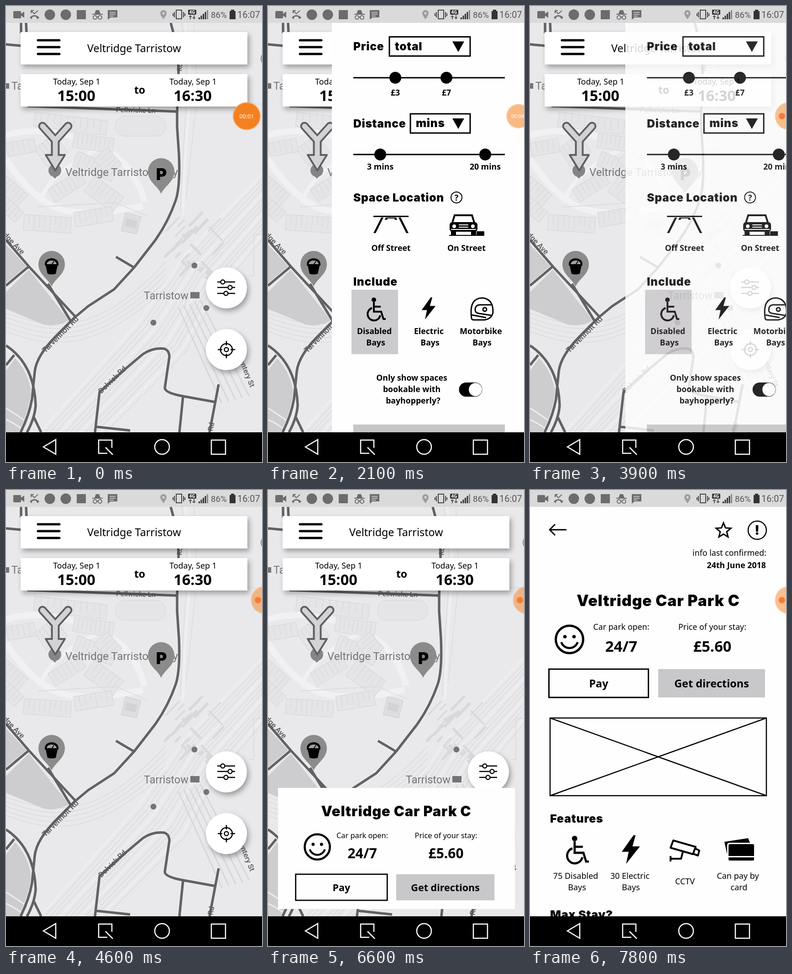
These frames come from a looping animation (561x998 px, 8 s). An HTML page:

```html
<!DOCTYPE html>
<html lang="en">
<head>
<meta charset="utf-8">
<title>Parking finder</title>
<style>
  html, body { margin: 0; width: 100%; height: 100%; overflow: hidden; background: #e9e8ea; }
  svg { display: block; width: 100%; height: 100%; }
  text { font-family: "Noto Sans", "Open Sans", sans-serif; }
  .b { font-weight: 700; }
  .h { font-family: Inter, sans-serif; font-weight: 900; letter-spacing: .03em; }
  .r { font-family: Roboto, sans-serif; fill: #747477; }
  .road { font-family: Roboto, sans-serif; font-weight: 500; fill: #59595c; }
  .m { text-anchor: middle; }
  .e { text-anchor: end; }
  .line { fill: none; stroke: #000; stroke-width: 3; }
  .shadow { filter: drop-shadow(4px 6px 6px #0005); }
</style>
</head>
<body>
<svg viewBox="0 0 561 998" preserveAspectRatio="none">
  <defs>
    <clipPath id="screen"><rect y="37" width="561" height="896"/></clipPath>
    <g id="wheelchair" fill="none" stroke="#000" stroke-width="4">
      <circle cx="-1" cy="-21" r="5" fill="#000" stroke="none"/>
      <path d="M-1-16V5H15L20 21H25M-1-6H14M-5-3A14 14 0 1 0 13 13"/>
    </g>
    <path id="bolt" d="M5-27L-17 4H-4L-9 27L17-6H3L9-27Z"/>
    <path id="pin" d="M0 44C-7 27-29 18-29-5A29 29 0 0 1 29-5C29 18 7 27 0 44Z" fill="#8b8b8c"/>
  </defs>
  <g clip-path="url(#screen)">
    <g id="map"></g>
    <g id="home"></g>
    <g id="panel"></g>
    <g id="card"></g>
    <g id="page"></g>
  </g>
  <g id="system"></g>
  <g id="timer"></g>
</svg>
<script>
const LOOP = 8000;
const $ = id => document.getElementById(id);
const text = (x, y, size, str, cls = '', extra = '') =>
  `<text x="${x}" y="${y}" font-size="${size}" class="${cls}" ${extra}>${str}</text>`;
const rect = (x, y, w, h, extra = '') =>
  `<rect x="${x}" y="${y}" width="${w}" height="${h}" ${extra}/>`;
const circle = (x, y, r, extra = '') => `<circle cx="${x}" cy="${y}" r="${r}" ${extra}/>`;
const path = (d, extra = '') => `<path d="${d}" ${extra}/>`;
const line = (d, color, width) =>
  path(d, `fill="none" stroke="${color}" stroke-width="${width}" stroke-linejoin="round"`);
const use = (id, x, y, scale = 1) =>
  `<use href="#${id}" transform="translate(${x} ${y}) scale(${scale})"/>`;
const tilted = (x, y, angle, size, str) =>
  text(0, 0, size, str, 'road', `transform="translate(${x} ${y}) rotate(${angle})"`);
const repeat = (n, fn) => Array.from({ length: n }, (_, i) => fn(i)).join('');

let seed = 7;
const random = () => (seed = seed * 16807 % 2147483647) / 2147483647;

// A row of narrow plots: x, y, width, height, angle, divisions
const plots = [
  [62, 312, 55, 48, -35, 5], [150, 278, 88, 32, 8, 9], [158, 318, 92, 34, 22, 9],
  [2, 372, 62, 38, 42, 6], [92, 402, 78, 32, -32, 7], [195, 372, 78, 42, 36, 7],
  [40, 456, 104, 34, 4, 9], [148, 452, 84, 32, -9, 7], [2, 418, 50, 30, 42, 5],
  [64, 232, 160, 32, 7, 11], [222, 310, 48, 40, 48, 5], [0, 300, 62, 30, -10, 5]
];

function drawMap() {
  const blocks = plots.map(([x, y, w, h, a, n]) =>
    `<g transform="translate(${x} ${y}) rotate(${a})" fill="#e5e4e7" stroke="#d5d4d7">` +
    rect(0, 0, w, h) + repeat(n - 1, i => path(`M${(i + 1) * w / n} 0v${h * (.5 + .5 * random())}`)) +
    '</g>').join('');
  const rails = repeat(14, i => line(
    `M${75 + i * 11} 933L${290 + i * 8} ${692 + i * 5}L${392 + i * 5} ${545 + i * 7}L561 ${368 + i * 11}`,
    i % 4 ? '#d9d8db' : '#efeef1', i % 4 ? 1.3 : 3));
  const curves = repeat(5, i => line(
    `M0 ${672 + i * 10}C90 ${702 + i * 11} 190 ${735 + i * 8} 350 ${560 + i * 14}`, '#d9d8db', 1.3));
  const sheds = repeat(26, i => {
    const x = 345 + random() * 110, y = 480 + random() * 110;
    return rect(0, 0, 12 + random() * 34, 3 + random() * 4,
      `fill="#d9d8db" transform="translate(${x} ${y}) rotate(${i % 3 ? -46 : 46})"`);
  });
  const platforms = repeat(5, i => line(`M${378 + i * 12} ${660 - i * 4}l${95 + i * 3} 210`, '#d7d6d9', 3));
  const roads = [
    'M361 37Q379 100 378 150L375 232V265L379 325Q382 395 372 425Q355 474 326 514L281 572L237 620L180 657L150 682L108 724Q67 766 63 800L57 860Q51 895 32 933',
    'M47 219L374 231M0 84L33 87M33 37V60M44 37L45 60',
    'M0 512L50 570L152 680M92 608L142 690M0 612L50 570M241 549L280 572',
    'M0 743Q62 784 65 874Q63 902 46 933M60 898L77 933M0 786L18 764',
    'M195 933L205 845L263 793L300 762Q322 747 347 750Q358 754 358 768L348 836Q349 847 388 854L460 867M388 854L380 933M466 828L446 933M198 921L272 929'
  ];
  $('map').innerHTML =
    rect(0, 37, 561, 896, 'fill="#e9e8eb"') +
    line('M0 283Q60 265 130 282Q250 310 286 383Q300 410 302 428M0 335Q45 405 98 436T300 438', '#f1f0f3', 14) +
    line('M75 430Q90 365 215 307', '#f1f0f3', 9) +
    line('M392 37Q409 130 400 235T388 460', '#efeef1', 5) +
    blocks +
    rect(240, 241, 110, 44, 'rx="21" fill="#e5e4e7" stroke="#d5d4d7"') +
    line('M385 37Q402 130 394 235T382 450M412 37L418 200L395 420M418 208L561 215M70 440L240 430L310 460', '#d9d8db', 1.3) +
    path('M262 452l34 9-10 38-34-7z', 'fill="#dedde0" stroke="#cccbce"') +
    path('M264 464l24 7-4 16-24-6z', 'fill="#d3d2d5"') +
    curves + rails + sheds + platforms +
    line('M561 500h-18v90h-10', '#d9d8db', 1.5) +
    path('M0 522L45 570L0 608ZM0 626L50 577L138 688Q110 704 82 697L0 663Z', 'fill="#cdcdcf"') +
    path('M0 798L20 771Q56 809 57 866Q48 909 30 933H0Z', 'fill="#cdcdcf"') +
    line('M0 880Q28 898 45 910M0 905Q22 915 36 927M20 771L0 750', '#ededf0', 3) +
    line(roads.join(''), '#ededf0', 8) + line(roads.join(''), '#626265', 5.5) +
    tilted(241, 232, 1.5, 15.5, 'Pellwicke Ln') + tilted(-18, 491, 46, 16.5, 'tridge Ave') +
    tilted(86, 760, -45, 17, 'Tarvenholt Rd') + tilted(209, 849, -44, 16.5, 'Dolvick Rd') +
    tilted(508, 768, 68, 16, 'Lantery St') + tilted(453, 931, -80, 16, 'Rd') + tilted(385, 143, -85, 15, 'Rd') +
    text(130, 372, 24, 'Veltridge Tarristow City', 'r') + text(302, 642, 23.5, 'Tarristow', 'r') +
    text(12, 183, 23, 'Ta', 'r') + rect(0, 169, 7, 12, 'fill="#747477"') + rect(404, 626, 20, 14, 'fill="#747477"') +
    [[413, 568], [439, 661], [323, 693]].map(([x, y]) => circle(x, y, 6.5, 'fill="#747477"')).join('') +
    circle(574, 115, 15, 'fill="#ccc" stroke="#8b8b8c" stroke-width="2"');
}

function drawHome() {
  const arrow = 'M80 263L108 294L136 263M108 294V328';
  const stroke = (color, width) =>
    path(arrow, `fill="none" stroke="${color}" stroke-width="${width}" stroke-linecap="round"`);
  const fab = y => circle(483, y, 45, 'fill="#fff" class="shadow"');
  const knob = (x, y) => circle(x, y, 4.5, 'fill="#fff"');
  $('home').innerHTML =
    circle(107, 360, 14, 'fill="#858587"') + path('M94 364L107 378L120 364Z', 'fill="#858587"') +
    stroke('#5f5f61', 19) +
    path('M87 326H129L108 360Z', 'fill="#d3d3d5" stroke="#5f5f61" stroke-width="4" stroke-linejoin="round"') +
    stroke('#d3d3d5', 11) +
    use('pin', 340, 367) + text(341, 381, 36, 'P', 'h m') +
    use('pin', 100, 570) +
    path('M85 568Q84 553 100 552Q116 553 115 568H113L109 586Q100 589 91 586L87 568Z') +
    path('M89 565Q91 557 100 557Q109 557 111 565Z', 'fill="#a0a0a1"') + line('M100 566L105 559', '#000', 2) +
    rect(32, 57, 497, 71, 'fill="#fff" class="shadow"') + rect(32, 149, 497, 71, 'fill="#fff" class="shadow"') +
    path('M70 75H117M70 90H117M70 105H117', 'stroke="#000" stroke-width="5" stroke-linecap="round"') +
    text(178, 101, 23.3, 'Veltridge Tarristow') +
    text(155, 172, 17.8, 'Today, Sep 1', 'm') + text(410, 172, 17.8, 'Today, Sep 1', 'm') +
    text(154, 208, 32.5, '15:00', 'b m') + text(409, 208, 32.5, '16:30', 'b m') + text(293, 192, 23, 'to', 'b m') +
    fab(617) + fab(752) +
    `<g class="line" style="stroke-width:2.5">` + path('M463 604H502M463 616H502M463 629H502') +
    knob(475, 604) + knob(491, 616) + knob(482, 629) +
    circle(483, 752, 13) + circle(483, 752, 4.5) + path('M483 733V743M483 761V771M464 752H474M492 752H502') + '</g>';
}

function drawPanel() {
  const select = (x, y, w, label) => rect(x, y, w, 42, 'class="line"') +
    text(x + 12, y + 29, 24.5, label, 'h') + path(`M404 ${y + 10}h26l-13 23z`);
  const slider = (y, stops) => path(`M187 ${y}H519`, 'class="line"') +
    stops.map(([x, label]) => circle(x, y, 13) + text(x, y + 39 - (y > 200) * 6, 17.7, label, 'b m')).join('');
  const label = (x, y, str) => text(x, y, 17.7, str, 'b m');
  $('panel').innerHTML =
    rect(140, 37, 421, 896, 'fill="#fefefe"') +
    text(187, 97, 24.5, 'Price', 'h') + select(266, 67.5, 177, 'total') + slider(157, [[279, '£3'], [391, '£7']]) +
    text(187, 266, 24.5, 'Distance', 'h') + select(312, 236, 131, 'mins') + slider(325, [[246, '3 mins'], [476, '20 mins']]) +
    text(187, 428, 24.5, 'Space Location', 'h') +
    circle(413, 419, 12, 'class="line" style="stroke-width:2"') + text(413, 426, 18, '?', 'b m') +
    path('M231 459H308V462H231ZM253 463L236 497H231L248 463ZM286 463L303 497H308L291 463ZM258 463H281L283 468H278L277 465H262L261 468H256Z') +
    label(269.5, 536, 'Off Street') +
    path('M404 474L409 458H447L452 474', 'fill="none" stroke="#000" stroke-width="4"') +
    rect(398, 473, 61, 21, 'rx="6"') + rect(401, 492, 11, 10) + rect(445, 492, 11, 10) +
    rect(457, 493, 17, 9) + path('M397 502H474', 'stroke="#000" stroke-width="2"') +
    circle(408, 482, 4, 'fill="#fff"') + circle(449, 482, 4, 'fill="#fff"') +
    path('M418 479H439M418 484H439M401 489H456', 'stroke="#fff" stroke-width="2"') +
    label(435, 536, 'On Street') +
    text(187, 612, 24.5, 'Include', 'h') + rect(183, 621, 102, 141, 'fill="#cbcacc"') +
    use('wheelchair', 233, 664) + use('bolt', 352, 662, .9) +
    `<g class="line">` +
    path('M446 683Q440 638 471 639Q494 642 493 671Q490 685 474 687H452Q446 687 446 683Z') +
    path('M489 654H463Q454 655 454 665Q454 672 463 673L489 677') + circle(475, 664, 4) + path('M446 676L478 682') + '</g>' +
    label(233, 718, 'Disabled') + label(236, 743, 'Bays') + label(352.5, 718, 'Electric') + label(355, 743, 'Bays') +
    label(466.5, 718, 'Motorbike') + label(469, 743, 'Bays') +
    label(315, 820, 'Only show spaces') + label(315, 845, 'bookable with') + label(318, 870, 'bayhopperly?') +
    rect(418.5, 824, 51, 31, 'rx="15.5"') + circle(454.5, 839.5, 14.5, 'fill="#fff"') +
    rect(187, 916, 332, 17, 'fill="#c5c4c6"');
}

const summary = smileX =>
  text(281, 254, 33.5, 'Veltridge Car Park C', 'h m') +
  `<g transform="translate(${smileX} 327)">` + circle(0, 0, 30, 'class="line" style="stroke-width:5"') +
  circle(-10, -6, 3.8) + circle(10, -6, 3.8) + line('M-18 6A19 19 0 0 0 18 6', '#000', 4.5) + '</g>' +
  text(200, 306, 17.8, 'Car park open:', 'm') + text(200, 354, 33, '24/7', 'b m') +
  text(399.5, 306, 17.8, 'Price of your stay:', 'm') + text(399.5, 354, 32.5, '£5.60', 'b m') +
  rect(41.5, 392, 218, 62, 'class="line"') + text(150.5, 432, 23.4, 'Pay', 'b m') +
  rect(281, 392, 234, 62, 'fill="#c8c7c9"') + text(398, 432, 23.4, 'Get directions', 'b m');

function drawPage() {
  const feature = (x, y, str) => text(x, y, 18, str, 'm');
  const star = repeat(10, i => {
    const a = i * Math.PI / 5, r = i % 2 ? 7.5 : 17;
    return `${i ? 'L' : 'M'}${424 + r * Math.sin(a)} ${89 - r * Math.cos(a)}`;
  });
  $('card').innerHTML = rect(22, 652, 519, 265, 'fill="#fefefe"') +
    `<g transform="translate(22.5 480.3) scale(.92)">${summary(93)}</g>`;
  $('page').innerHTML =
    rect(0, 0, 561, 933, 'fill="#fefefe"') +
    line('M80 87H44M55 75L43 87L55 99', '#000', 3) + path(star + 'Z', 'class="line"') +
    circle(498, 88, 20, 'class="line" style="stroke-width:2.5"') + text(498, 98, 28, '!', 'h m') +
    text(518, 144, 17.8, 'info last confirmed:', 'e') + text(517, 171, 17.8, '24th June 2018', 'b e') +
    summary(86.5) +
    path('M44 499H518V669H44ZL518 669M518 499L44 669', 'class="line" style="stroke-width:2.5"') +
    text(44, 728, 25, 'Features', 'h') +
    use('wheelchair', 99, 788, 1.2) + use('bolt', 221, 787, 1.17) +
    line('M314 767L363 781L357 797L308 783ZM363 785L371 789L368 800L357 796M335 792L331 807H308M308 801V813', '#000', 4) +
    path('M426 770L478 762L482 772H437Q432 772 432 778V797Z') +
    path('M438 775H488Q491 775 491 778V801H435V778Q435 775 438 775ZM435 804H491V808Q491 811 488 811H438Q435 811 435 808Z') +
    feature(100, 851, '75 Disabled') + feature(103, 876, 'Bays') + feature(219, 851, '30 Electric') + feature(221, 876, 'Bays') +
    feature(339.5, 863, 'CCTV') + feature(455.5, 851, 'Can pay by') + feature(458, 876, 'card') +
    text(44, 938, 25, 'Max Stay?', 'h');
}

function drawSystem() {
  const gray = '#6c6c6d';
  $('system').innerHTML =
    rect(0, 0, 561, 37, 'fill="#dadadb"') + `<g fill="${gray}">` +
    rect(16, 11, 17, 16, 'rx="2"') + path('M33 17L40 12V26L33 21Z') +
    path('M52 25Q62 15 73 25L69 29L66 24Q62 22 58 24L56 29Z') + line('M55 10L62 17L70 10M55 16V10H61', gray, 2) +
    circle(96, 19, 11.5) + circle(131, 19, 11.5) + rect(155, 9, 20, 20) +
    path('M194 17L197 9H204L207 17H212V19H189V17Z') +
    `<g fill="none" stroke="${gray}" stroke-width="2">` + circle(195, 25, 4) + circle(206, 25, 4) + path('M199 24H202') + '</g>' +
    path('M223 9H244V25H229L223 30Z') + path('M227 14H240M227 18H240M227 22H236', 'stroke="#dadadb" stroke-width="1.6"') +
    path('M345 29Q338 20 338 16A7 7 0 0 1 352 16Q352 20 345 29Z', 'opacity=".55"') + circle(345, 16, 2.5, 'fill="#dadadb"') + '</g>' +
    line('M373 9H385V28H373ZM369 13V25M389 13V25M366 16V22M392 16V22', '#444', 2) +
    rect(399, 8, 18, 11, 'rx="2" fill="#333"') + text(408, 17, 10, '4G', 'b m', 'fill="#fff"') +
    path('M404 20L408 24H405V29H403V24H400ZM412 29L408 25H411V20H413V25H416Z', 'fill="#555"') +
    repeat(5, i => rect(422 + i * 4.5, 25 - i * 4, 3, 4 + i * 4, `fill="${i < 4 ? '#333' : '#888'}"`)) +
    text(449, 26, 18.8, '86%', 'r', 'style="fill:#555"') +
    rect(490, 11, 13, 18, 'fill="#333"') + rect(493, 8, 7, 4, 'fill="#333"') +
    text(507, 26, 20, '16:07', 'r', 'style="fill:#555"') +
    rect(0, 933, 561, 65) + `<g fill="none" stroke="#fff" stroke-width="2.5">` +
    path('M109 949V981L82 965Z') + path('M222 979H203V950H232V967M218 966L234 982') + circle(342, 965, 16) + rect(450, 950, 31, 31) + '</g>';
}

function animate(el, steps) {
  el.animate(steps.map(([t, style, easing = 'linear']) => ({ offset: t / LOOP, easing, ...style })),
    { duration: LOOP, iterations: Infinity });
}
const slide = (x, y, opacity = 1) => ({ transform: `translate(${x}px, ${y}px)`, opacity });
// Visible only between two moments
const showDuring = (el, from, to) => animate(el, [
  [0, { opacity: from ? 0 : 1 }, 'step-end'],
  ...(from ? [[from, { opacity: 1 }, 'step-end']] : []),
  ...(to < LOOP ? [[to, { opacity: 0 }, 'step-end']] : []),
  [LOOP, { opacity: to < LOOP ? 0 : 1 }]
]);

function drawTimer() {
  const clocks = [[0, 100], [100, 1100], [1100, 2100], [2100, 2300]];
  $('timer').innerHTML =
    `<g id="bubble">${circle(0, 0, 30.5, 'fill="#f8a55e"')}${circle(0, 0, 28.5, 'fill="#f58020"')}</g>` +
    `<g id="clock">${clocks.map((_, i) => text(0, 4.5, 12.5, `00:0${i + 1}`, 'm', 'fill="#fff"')).join('')}</g>` +
    circle(552, 241, 7, 'fill="#f47b38" id="dot"');
  clocks.forEach(([from, to], i) => showDuring($('clock').children[i], from, to));
  showDuring($('dot'), 2300, LOOP);
  const place = (x, scale, opacity) => ({ transform: `translate(${x}px, 241px) scale(${scale})`, opacity });
  const start = place(527.5, 1, 1), half = place(549, .88, .55), docked = place(567, 1, .5);
  animate($('bubble'), [[0, start], [1950, start], [2100, half], [2290, half], [2310, docked], [LOOP, docked]]);
  const mid = place(547, .92, 1);
  animate($('clock'), [[0, start], [1950, start], [2100, mid], [LOOP, mid]]);
}

drawMap();
drawHome();
drawPanel();
drawPage();
drawSystem();
drawTimer();

const panelOff = slide(421, 0, 0), cardOff = slide(0, 281, .3), pageOff = slide(0, 933), shown = slide(0, 0);
animate($('panel'), [
  [0, panelOff], [500, panelOff, 'ease-out'], [900, shown],
  [3860, shown, 'ease-out'], [4260, panelOff], [LOOP, panelOff]
]);
animate($('card'), [[0, cardOff], [5290, cardOff, 'ease-out'], [5690, shown], [LOOP, shown]]);
animate($('page'), [[0, pageOff], [6985, pageOff, 'ease-out'], [7385, shown], [LOOP, shown]]);
</script>
</body>
</html>
```
